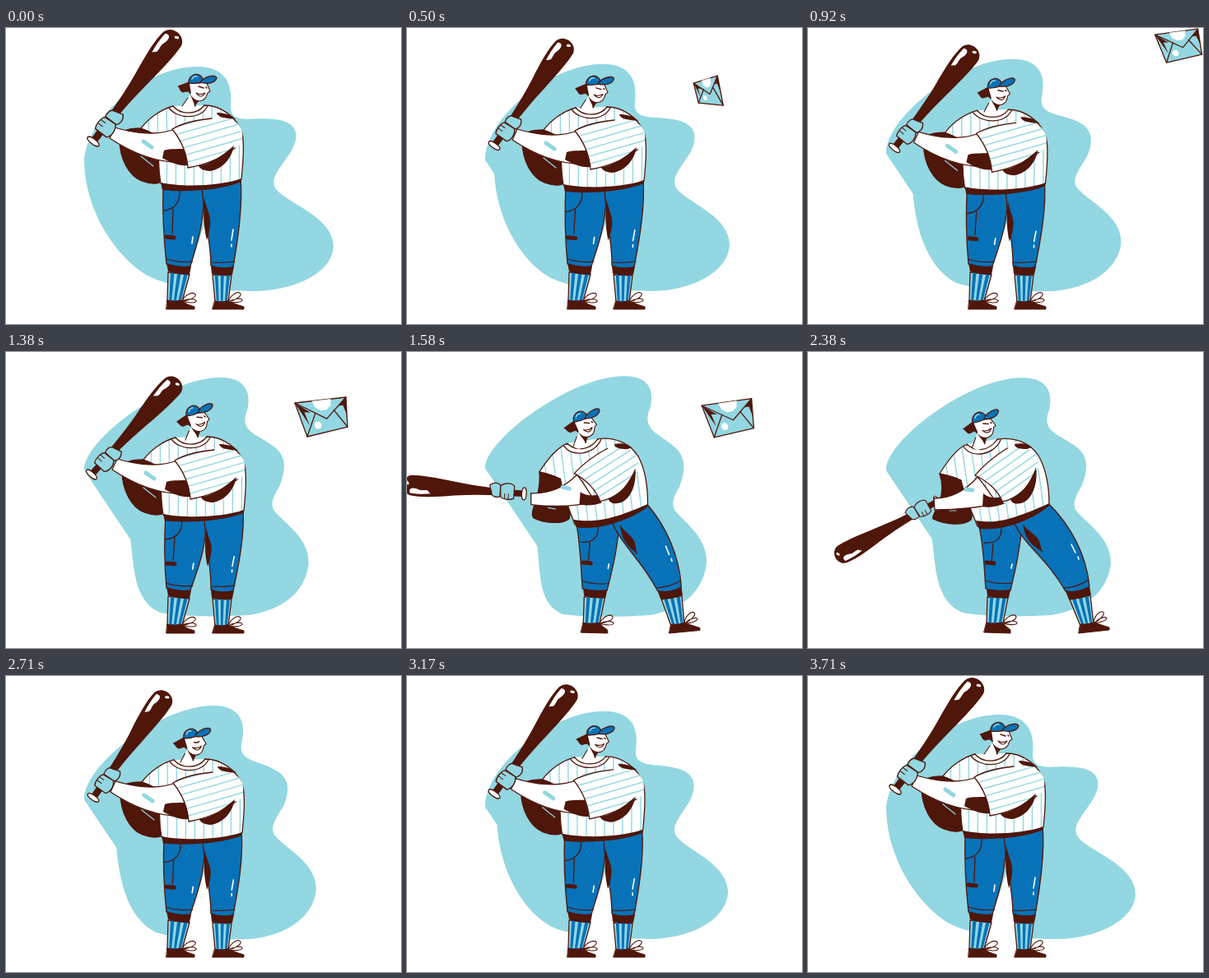
Write an HTML page with a canvas that moves like this. It is 480 by 360 pixels and loops after 3.75 s.

```html
<!DOCTYPE html>
<html>
<head>
<meta charset="utf-8">
<style>
html, body { margin: 0; width: 100%; height: 100%; overflow: hidden; background: #fff }
canvas { display: block }
</style>
</head>
<body>
<canvas id="stage" width="480" height="360"></canvas>
<script>
const ctx = document.getElementById('stage').getContext('2d');
const LOOP = 3750, BROWN = '#4f160a', BLUE = '#0872b8', CYAN = '#92d7e2', WHITE = '#fff';
const STAND = 0, LOWERED = 1, SWING = 2;

// Each outline is given for the three poses: standing, bat lowered, full swing.
const shapes = {
  leftPants: ['M191 188 C190 220 192 260 195 287 C205 291 215 291 224 290 C232 262 241 240 241 192 Z',
    'M208 212 C214 240 214 265 216 288 C226 292 236 292 246 290 C252 265 258 240 261 200 Z',
    'M222 216 C240 240 242 265 205 285 C208 297 213 305 220 312 C260 312 285 285 284 212 Z'],
  rightPants: ['M238 192 C240 225 249 260 249 289 C258 293 268 293 276 291 C282 255 288 215 285 182 Z',
    'M250 206 C262 235 290 250 313 291 C323 293 333 291 342 285 C338 245 318 210 293 185 Z',
    'M250 212 C290 225 305 255 318 287 C330 293 342 293 352 290 C354 255 345 215 322 194 Z'],
  crotch: ['M241 206 C243 220 250 228 248 240 C247 250 245 255 244 258 C241 245 239 230 241 206 Z',
    'M261 209 C265 217 278 222 281 230 C283 236 283 240 286 244 C274 236 264 230 261 209 Z',
    'M280 218 C288 224 300 232 303 240 C304 246 304 250 306 254 C294 246 284 238 280 218 Z'],
  leftCuff: ['M195 286 Q209 291 225 290 L223 300 Q208 300 197 296 Z',
    'M217 288 Q232 291 246 289 L244 299 Q230 300 218 297 Z',
    'M214 283 Q215 298 221 312 L211 312 Q208 300 204 286 Z'],
  rightCuff: ['M249 289 Q262 293 277 290 L275 300 Q262 302 250 299 Z',
    'M313 291 Q330 292 342 285 L344 295 Q332 301 317 301 Z',
    'M316 290 Q335 293 352 290 L352 301 Q335 304 318 300 Z'],
  leftSock: ['M197 297 L223 300 L214 332 L196 332 Z', 'M218 298 L243 299 L237 330 L217 330 Z',
    'M206 286 L214 313 L157 301 L159 286 Z'],
  rightSock: ['M251 300 L274 301 L270 333 L254 333 Z', 'M318 301 L343 296 L347 330 L331 333 Z',
    'M329 302 L351 301 L344 333 L331 333 Z'],
  leftShoe: ['M196 331 Q205 334 213 331 Q220 337 229 339 L229 342 L195 342 Z',
    'M217 329 Q226 332 236 329 Q242 335 246 338 L246 342 L214 341 Z',
    'M158 284 Q154 293 156 301 Q151 303 148 309 L137 303 L150 281 Z'],
  rightShoe: ['M254 332 Q262 335 271 331 Q279 337 289 339 L289 342 L251 342 Z',
    'M331 331 Q339 332 347 329 Q357 332 366 335 L366 338 L329 342 Z',
    'M330 332 Q337 335 345 332 Q353 337 364 340 L364 342 L326 342 Z'],
  pocket: ['M211 198 C212 212 204 221 192 222 M203 220 L202 250',
    'M235 212 C236 228 228 233 214 232 M225 233 L223 255',
    'M246 215 C248 232 242 238 232 236 M238 237 L234 262'],
  seam: ['M195 281 Q210 286 227 284 M249 285 Q262 286 278 284',
    'M216 278 Q230 283 248 281 M311 287 Q328 286 341 277',
    'M212 280 Q222 300 228 311 M318 282 Q335 281 352 278'],
  patch: ['M195 254 L204 255', 'M217 256 L226 257', 'M229 263 L240 264'],
  shine: ['M227 254 L226 262 M276 245 L274 258 M274 263 L274 266',
    'M248 258 L247 263 M320 234 L325 244 M328 249 L329 252',
    'M273 250 L271 258 M332 237 L336 249 M338 256 L339 258'],
  torso: ['M203 95 C188 99 173 110 164 122 C173 125 182 130 187 134 C185 152 185 172 188 189 C215 197 260 195 286 184 C288 165 290 142 287 128 C280 107 260 94 241 94 C230 104 214 104 203 95 Z',
    'M191 113 C178 120 168 135 160 148 C170 150 180 153 186 156 C190 175 198 192 206 212 C235 216 270 205 293 185 C293 160 288 140 280 126 C270 110 250 103 231 106 C222 120 205 121 191 113 Z',
    'M204 122 C188 130 174 155 176 187 C185 193 195 190 205 192 C212 198 214 206 217 216 C240 218 270 208 305 190 C305 175 310 160 306 148 C295 115 270 108 247 111 C240 130 215 134 204 122 Z'],
  hem: ['M188 188 C215 194 262 192 286 183 L286 187 C260 198 215 200 190 197 Z',
    'M204 205 C225 208 240 208 293 184 L293 187 C270 206 235 218 208 215 Z',
    'M216 214 C240 212 260 208 290 198 L290 202 C270 212 240 222 219 224 Z'],
  collar: ['M203 95 C212 106 232 106 241 94 M198 97 C208 111 236 112 245 95',
    'M193 112 C203 122 220 121 230 106 M189 115 C198 130 226 126 234 107',
    'M207 121 C217 130 236 127 244 111 M203 124 C212 137 242 132 248 111'],
  backArm: ['M164 122 C145 122 139 126 138 135 C138 160 150 180 165 186 C178 191 188 189 188 186 C188 165 188 150 187 134 C180 129 172 124 164 122 Z',
    'M160 148 C164 160 164 170 160 182 C155 195 150 200 152 203 C168 211 190 211 198 204 C202 195 196 178 190 158 C182 152 172 150 160 148 Z',
    'M177 183 C200 160 240 182 270 180 C300 176 330 162 344 150 C350 152 354 158 354 162 C325 192 265 214 215 207 C200 206 176 197 177 183 Z'],
  elbow: ['M164 156 L179 168', 'M172 193 L180 193', 'M250 190 L259 182'],
  frontArm: ['M132 121 C155 128 185 132 207 122 C214 135 218 150 220 163 C195 165 165 160 126 134 Z',
    'M153 178 C175 178 192 168 206 152 C214 160 222 175 230 184 C205 190 180 192 154 192 Z',
    'M345 150 C325 165 312 165 308 150 C300 155 295 160 290 165 C300 180 330 175 352 160 Z'],
  armShade: ['M192 149 C200 146 212 148 220 146 L221 167 C210 169 195 161 190 158 Z',
    'M213 172 C220 178 228 178 236 176 L240 184 C230 188 218 190 212 188 Z',
    'M290 148 C298 150 305 150 308 148 L310 158 C305 172 295 172 292 165 Z'],
  armShine: ['M167 138 L177 145', 'M192 167 L200 168', 'M340 155 L342 154'],
  sleeve: ['M202 123 C220 112 255 106 275 112 C292 120 290 140 278 148 C262 158 240 166 221 170 C220 155 214 138 202 123 Z',
    'M203 150 C215 135 240 113 262 115 C280 120 284 140 276 150 C270 168 255 180 238 184 C232 170 220 158 203 150 Z',
    'M250 150 C260 130 280 118 296 126 C304 135 308 145 306 150 C296 155 285 165 275 178 C262 170 255 160 250 150 Z'],
  sleeveEdge: ['M250 110 C230 112 212 117 202 123 C214 138 220 155 221 170 C245 166 262 158 278 146',
    'M242 117 C228 126 213 138 203 150 C220 158 232 170 236 182 C255 178 268 165 276 146',
    'M250 152 C262 168 268 175 274 180 C282 168 290 158 300 148 C302 147 306 147 308 150'],
  sleeveShade: ['M277 143 C274 160 262 172 248 174 C240 174 234 170 234 167 C246 167 262 156 277 143 Z',
    'M277 140 C280 160 272 182 258 184 C250 186 246 182 246 178 C258 176 270 160 277 140 Z',
    'M272 172 C276 176 274 180 270 182 C266 182 262 180 262 178 C266 178 270 176 272 172 Z'],
  shoulder: ['M256 103 C264 103 274 105 279 111 L270 110 C262 109 257 107 256 103 Z',
    'M251 112 C260 110 268 112 272 116 L266 118 C258 118 251 117 251 112 Z',
    'M264 122 C274 117 286 118 292 122 L285 124 C275 126 264 128 264 122 Z']
};
const blobs = ['M95 165 C95 110 170 47 232 47 C272 47 275 75 273 95 C272 118 300 108 325 111 C352 113 358 128 348 147 C335 170 318 182 329 197 C345 215 398 230 398 266 C396 298 350 320 300 320 C250 319 200 317 170 300 C130 275 97 220 95 165 Z',
  'M95 140 C93 108 200 28 266 28 C298 28 302 48 297 66 C285 92 305 98 322 113 C340 128 337 145 330 165 C322 178 322 185 325 192 C340 210 362 225 362 255 C358 290 335 312 295 320 C255 323 215 323 190 320 C160 308 167 270 162 240 C150 200 100 175 95 140 Z'];

// time, pose, body x y, bat x y angle scale, head x y angle
const bodyKeys = [
  [0, STAND, 0, 0, 106, 138, -52.4, 1.07, 0, 0, 0],
  [500, STAND, 2, 2, 106, 143, -54.5, 1, -4, 2, -2],
  [1380, STAND, 3, 9, 104, 149, -47.6, 1, -1, 9, -13],
  [1640, LOWERED, 0, 0, 148, 176, -195, 0.93, -20, 17, -15],
  [1810, SWING, 0, 0, 330, 175, -398.8, 0.92, 1, 21, -20],
  [1880, SWING, 0, 0, 330, 175, -398.8, 0.92, 1, 21, -20],
  [2150, LOWERED, 0, 0, 157, 182, -205, 0.9, -20, 17, -15],
  [2380, LOWERED, 0, 0, 157, 182, -209, 0.9, -20, 17, -15],
  [2690, STAND, 1, 7, 106, 148, -54.8, 1, -5, 8, -8],
  [3710, STAND, 0, 0, 106, 138, -52.4, 1.07, 0, 0, 0],
  [LOOP, STAND, 0, 0, 106, 138, -52.4, 1.07, 0, 0, 0]
];
// time, then the four corners of the envelope
const mailKeys = [
  [300, 452, 30, 456, 29, 457, 33, 453, 34],
  [500, 348, 67, 377, 58, 384, 94, 354, 91],
  [720, 400, 88, 440, 76, 449, 108, 413, 116],
  [920, 422, 8, 474, 1, 479, 32, 436, 42],
  [1130, 354, 40, 414, 31, 417, 67, 369, 78],
  [1380, 351, 62, 413, 55, 415, 91, 366, 103],
  [1630, 360, 66, 420, 57, 423, 93, 375, 104],
  [1830, 405, 49, 457, 35, 465, 66, 423, 82],
  [2250, 450, 35, 454, 34, 456, 37, 452, 39]
];

const lerp = (a, b, k) => a + (b - a) * k;
const ease = k => k * k * (3 - 2 * k);
const NUMBER = /-?[\d.]+/g;
const numbers = d => d.match(NUMBER).map(Number);

function sample(keys, t, curve = k => k) {
  const i = Math.max(1, keys.findIndex(key => key[0] >= t));
  const from = keys[i - 1], to = keys[i];
  const k = curve((t - from[0]) / (to[0] - from[0]));
  return { from, to, k, v: from.map((n, j) => lerp(n, to[j], k)) };
}

function morph(a, b, k) {
  const target = numbers(b);
  let i = 0;
  return a.replace(NUMBER, n => lerp(+n, target[i++], k).toFixed(2));
}

function paint(d, fill, stroke, width = 1.3) {
  const p = new Path2D(d);
  if (fill) { ctx.fillStyle = fill; ctx.fill(p); }
  if (stroke) { ctx.strokeStyle = stroke; ctx.lineWidth = width; ctx.stroke(p); }
}

function group(x, y, degrees, scale, draw) {
  ctx.save();
  ctx.translate(x, y);
  ctx.rotate(degrees * Math.PI / 180);
  ctx.scale(scale, scale);
  draw();
  ctx.restore();
}

// Turns unit coordinates into a polygon inside four corners
const inQuad = c => (...uv) => {
  let d = '';
  for (let i = 0; i < uv.length; i += 2) {
    const [u, v] = [uv[i], uv[i + 1]];
    const at = j => lerp(lerp(c[j], c[j + 2], u), lerp(c[j + 6], c[j + 4], u), v).toFixed(2);
    d += (i ? 'L' : 'M') + at(0) + ' ' + at(1);
  }
  return d;
};

function stripes(d, x, y, degrees, gap) {
  ctx.save();
  ctx.clip(new Path2D(d));
  group(x, y, degrees, 1, () => {
    for (let i = -130; i < 130; i += gap) paint(`M${i} -130 Q${i + 3} 0 ${i} 130`, null, CYAN, 1.4);
  });
  ctx.restore();
}

function drawMail(t) {
  if (t < 300 || t > 2250) return;
  const q = inQuad(sample(mailKeys, t).v.slice(1));
  paint(q(0, 0, 1, 0, 1, 1, 0, 1) + 'Z', CYAN, BROWN);
  paint(q(0.33, 0, 0.7, 0, 0.68, 0.2, 0.58, 0.32, 0.46, 0.32, 0.36, 0.2), WHITE);
  paint(q(0, 0, 0.24, 0.34, 0.12, 0.3, 0.14, 0.7) + 'Z', BROWN);
  paint(q(1, 0, 0.83, 0.26, 0.93, 0.25, 1, 0.6) + 'Z', BROWN);
  paint(q(0.28, 0.64, 0.37, 0.64, 0.41, 0.75, 0.36, 0.86, 0.27, 0.84, 0.24, 0.74), WHITE);
  paint(q(0, 0, 0.55, 0.6, 1, 0) + q(0, 1, 0.34, 0.37) + q(1, 1, 0.73, 0.36), null, BROWN);
}

function drawHead([x, y, degrees], t) {
  group(230 + x, 75 + y, degrees, 1, () => {
    ctx.translate(-230, -75);
    paint('M222 66 L209 71 C212 73 211 77 215 78 C218 78 221 75 224 80 L227 67 Z', BROWN, BROWN, 1);
    paint('M223 67 L225 80 L214 95 C217 102 226 102 230 95 L230 88 C236 90 241 88 243 84 L245 79 L248 77 L244 67 Z', WHITE);
    paint('M221 85 L214 95 M230 95 L230 88 C236 90 241 88 243 84 L245 79 L248 77 L244 67', null, BROWN, 1.1);
    paint('M224 80 C227 86 230 87 234 89 L229 96 C229 90 226 88 224 80 Z', BROWN);
    paint('M222 67 C221 55 239 51 240 66 Q231 68 222 67 Z', BLUE, BROWN);
    paint('M236 66 C242 58 256 56 256 61 C254 67 244 69 236 66 Z', BLUE, BROWN);
    paint('M226 62 Q228 58 232 59', null, CYAN, 1.5);
    paint(t > 2600 && t < 2850 ? 'M234 73 Q237 75 240 73' : 'M234 71 L240 73 M243 72 L244 73', null, BROWN, 1.5);
    paint('M231 79 Q236 82 242 79 Q237 87 231 79 Z', WHITE, BROWN, 1.1);
  });
}

function drawBat() {
  paint('M2 -4 C30 -4 60 -5 90 -9 C115 -13 135 -15 147 -13 C160 -10 160 10 147 13 C135 14 115 12 90 9 C60 5 30 4 2 4 Z', BROWN);
  paint('M147 -10 C137 -11 128 -10 121 -9 L125 -5 C131 -4 132 -7 139 -4 C146 -2 150 -5 147 -10 Z', WHITE);
  paint('M151 2 L152 4', null, WHITE, 3);
  paint('M0 -8 C4 -8 4 8 0 8 C-4 8 -4 -8 0 -8 Z', WHITE, BROWN);
}

function drawGloves() {
  paint('M31 -6 C36 -8 42 -6 42 -2 L45 8 C40 13 34 12 31 9 Z', CYAN, BROWN);
  paint('M13 -7 C18 -10 28 -9 30 -6 L31 8 C26 13 17 13 13 9 Z', CYAN, BROWN);
  paint('M20 -8 L20 -2 M25 -8 L25 -2', null, BROWN, 1);
}

function drawFoot(sockPath, shoePath) {
  const c = numbers(sockPath), q = inQuad(c);
  paint(sockPath, CYAN, BROWN);
  for (const u of [0.12, 0.43, 0.74]) paint(q(u, 0, u + 0.17, 0, u + 0.17, 1, u, 1) + 'Z', BLUE);
  paint(shoePath, BROWN, BROWN, 1);
  const turn = Math.atan2(c[5] + c[7] - c[1] - c[3], c[4] + c[6] - c[0] - c[2]) * 180 / Math.PI - 90;
  group(c[4], c[5], turn, 1, () =>
    paint('M0 0 C3 -9 12 -14 15 -10 C16 -6 6 -1 0 0 C8 -5 17 -5 17 -2 C15 1 6 1 0 0 Z', WHITE, BROWN, 1.1));
}

function draw(t) {
  ctx.fillStyle = WHITE;
  ctx.fillRect(0, 0, 480, 360);
  paint(morph(...blobs, Math.sin(Math.PI * t / LOOP) ** 2), CYAN);
  drawMail(t);

  const { from, to, k, v } = sample(bodyKeys, t, ease);
  const [, , bodyX, bodyY, batX, batY, batAngle, batScale, ...head] = v;
  const swinging = (k < 0.5 ? from : to)[1] === SWING;
  // Body offsets fade out towards the feet
  const path = name => {
    let x, y, isX = true;
    return morph(shapes[name][from[1]], shapes[name][to[1]], k).replace(/(\S+?) (-?[\d.]+)/g, (m, a, b) => {
      const fade = Math.min(1, Math.max(0, (285 - b) / 95));
      return a[0].replace(/[\d.-]/, '') + (+a.replace(/[A-Z]/, '') + bodyX * fade) + ' ' + (+b + bodyY * fade);
    });
  };
  const part = (name, ...style) => paint(path(name), ...style);
  const byPose = (...values) => lerp(values[from[1]], values[to[1]], k);
  const backArm = () => {
    part('backArm', BROWN, BROWN);
    part('elbow', null, CYAN, 1.2);
  };
  const inBat = content => group(batX, batY, batAngle, batScale, content);

  if (t < 1130 || t > 2600) paint('M242 236 L222 296 L216 343 L256 343 L252 290 Z', WHITE);
  if (!swinging) backArm();

  drawFoot(path('leftSock'), path('leftShoe'));
  drawFoot(path('rightSock'), path('rightShoe'));
  part('leftPants', BLUE, BROWN);
  part('rightPants', BLUE, BROWN);
  part('crotch', BROWN);
  part('leftCuff', BROWN);
  part('rightCuff', BROWN);
  part('pocket', null, BROWN);
  part('seam', null, BROWN, 1.1);
  part('patch', null, BROWN, 5);
  part('shine', null, WHITE, 1.6);

  part('torso', WHITE);
  stripes(path('torso'), byPose(236, 244, 240) + bodyX, 150 + bodyY, byPose(0, -8, 12), 11);
  part('hem', BROWN);
  part('torso', null, BROWN);
  part('collar', WHITE, BROWN);
  drawHead(head, t);

  inBat(drawBat);
  part('frontArm', swinging ? BROWN : WHITE, BROWN);
  part('armShade', BROWN);
  if (!swinging) part('armShine', null, CYAN, 5);
  part('sleeve', WHITE);
  stripes(path('sleeve'), byPose(245, 245, 280) + bodyX, byPose(140, 150, 150) + bodyY, byPose(74, 55, 12), 9);
  part('sleeveShade', BROWN);
  part('sleeveEdge', null, BROWN);
  part('shoulder', BROWN);
  if (swinging) backArm();
  inBat(drawGloves);
}

ctx.lineCap = ctx.lineJoin = 'round';
(function frame() {
  draw(performance.now() % LOOP);
  requestAnimationFrame(frame);
})();
</script>
</body>
</html>
```
